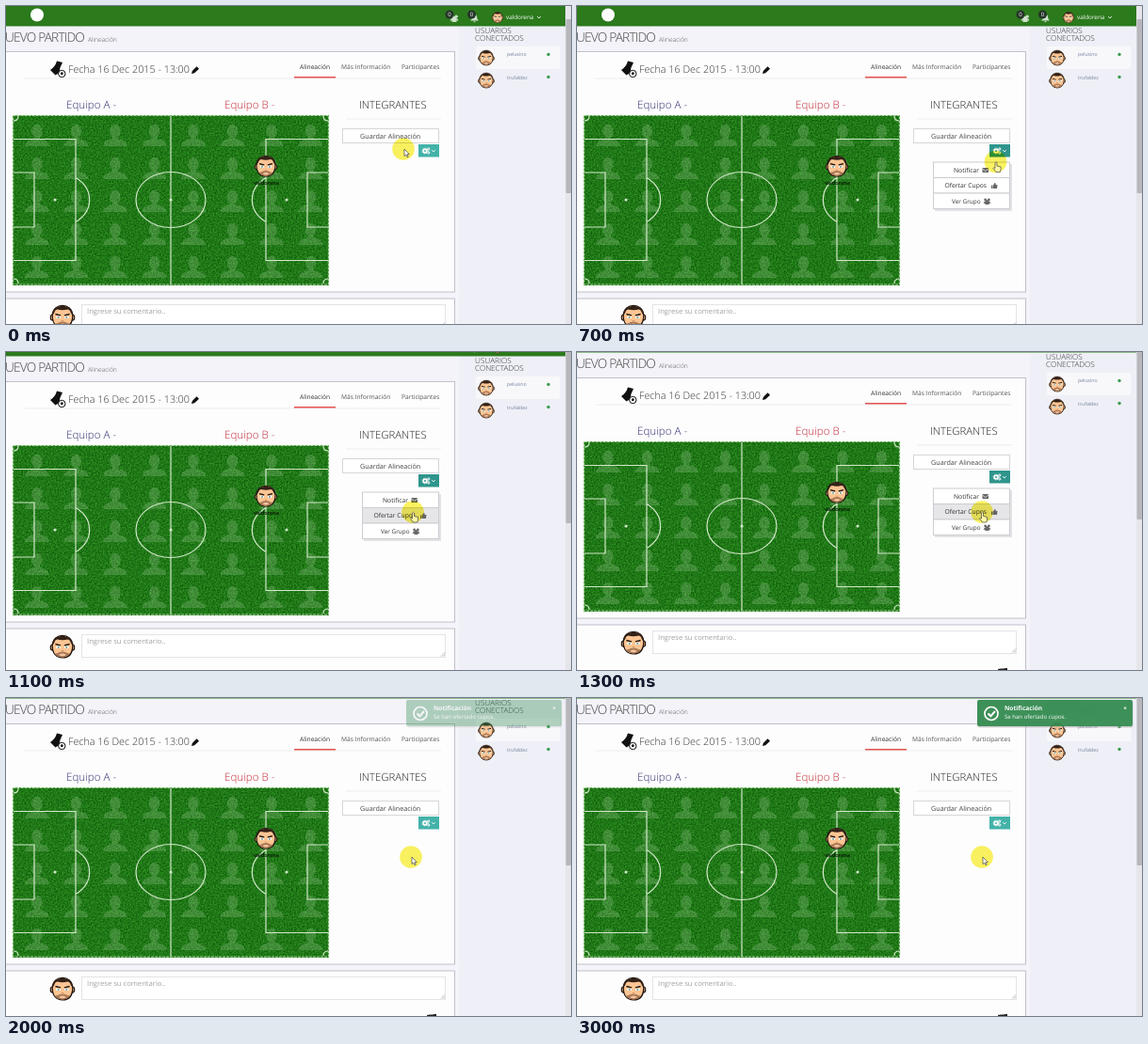
Recreate the animation shown at these times as an HTML page. Size 600 px wide and 338 px high, loop 3.1 s.

```html
<!DOCTYPE html>
<html lang="es">
<head>
<meta charset="utf-8">
<style>
html, body { margin: 0; width: 100%; height: 100%; overflow: hidden; background: #f3f3f9; }
svg { display: block; width: 600px; height: 338px; font-family: "Open Sans", "Noto Sans", sans-serif; text-rendering: geometricPrecision; }
.light { font-weight: 300; }
.line { fill: none; stroke: #d3e8cb; stroke-width: 1.2; }
#halo { mix-blend-mode: multiply; }
</style>
</head>
<body>
<svg viewBox="0 0 600 338">
  <defs>
    <filter id="grass" x="0" y="0" width="1" height="1" color-interpolation-filters="sRGB">
      <feTurbulence type="fractalNoise" baseFrequency=".6" numOctaves="2" seed="4"/>
      <feColorMatrix values=".25 0 0 0 0  .4 0 0 0 .27  .2 0 0 0 -.01  0 0 0 0 1"/>
    </filter>
    <g id="face">
      <ellipse cx="-10" cy="1" rx="1.800" ry="2.800" fill="#f0b27c" stroke="#1c130e"/>
      <ellipse cx="10" cy="1" rx="1.800" ry="2.800" fill="#f0b27c" stroke="#1c130e"/>
      <path d="M-10-1C-9.500-14 9.500-14 10-1 10 7 6 11 0 11S-10 7-10-1Z" fill="#fcc593" stroke="#1c130e" stroke-width="1.200"/>
      <path d="M-9.800-1C-9.300-13.500 9.300-13.500 9.800-1L8-4Q7-7 5-7 0-5.500-5-7-7-7-8-4Z" fill="#332117"/>
      <path d="M-7.500 7Q-4 6.500-3 5.500 0 4.500 3 5.500 4 6.500 7.500 7 5 10.800 0 10.800T-7.500 7Z" fill="#a97855"/>
      <path d="M-3.500 8Q0 6 3.500 8 2 9.500 0 9.500T-3.500 8Z" fill="#f3c4a0"/>
      <path d="M-7-2.300L-1.800-1M7-2.300L1.800-1" stroke="#1c130e" stroke-width="1.300"/>
      <path d="M-6.200 .8H-2M6.200 .8H2" stroke="#fff" stroke-width="2"/>
      <path d="M-4.800 .8H-3.200M4.800 .8H3.200" stroke="#5a9a9a" stroke-width="1.800"/>
      <path d="M-1.200 4Q0 4.700 1.200 4" fill="none" stroke="#cf8d60" stroke-width=".8"/>
    </g>
    <g id="bust">
      <ellipse cy="-4" rx="5.700" ry="7.200"/>
      <path d="M-13 12Q-13 6-3 4V0H3V4Q13 6 13 12Z"/>
    </g>
    <g id="half" class="line">
      <path d="M8 141.500H74V270.500H8M8 177H30V235H8M74 182.500A37 29.500 0 0 1 74 229.500M8 122Q13 122 13 117M8 290Q13 290 13 295"/>
      <circle cx="52" cy="206" r="1" fill="#fff"/>
    </g>
    <g id="people">
      <circle cx="-2.200" cy="-1.800" r="1.600"/><circle cx="2.200" cy="-1.800" r="1.600"/><circle r="1.900"/>
      <path d="M-4.500 2.500Q-4 0-2 0H2Q4 0 4.500 2.500ZM-2.800 4Q-2.500 1.500 0 1.500T2.800 4Z"/>
    </g>
    <path id="chevron" d="M-1.700-.8L0 .9 1.700-.8" fill="none" stroke="#fff"/>
  </defs>

  <rect width="600" height="338" fill="#f3f3f9"/>
  <g id="page">
    <rect x="481" width="113" height="380" fill="#eff0f7"/>
    <g class="light" font-size="8.200" fill="#333">
      <text x="498" y="28.500">USUARIOS</text><text x="498" y="36.500">CONECTADOS</text>
    </g>
    <rect x="499" y="43" width="89" height="24" rx="2" fill="#f8f8fb"/>
    <g font-size="5.200" fill="#71809a">
      <text x="532" y="53">pelusino</text><text x="532" y="77.500">trufaldez</text>
    </g>
    <use href="#face" transform="translate(510 55) scale(.72)"/>
    <use href="#face" transform="translate(510 79) scale(.72)"/>
    <circle cx="576" cy="51.500" r="1.700" fill="#3b9c52"/><circle cx="576" cy="75.500" r="1.700" fill="#3b9c52"/>

    <rect width="594" height="22" y="-.5" fill="#2b7a1c"/>
    <circle cx="33" cy="9.500" r="7" fill="#fff"/>
    <g fill="#cfe3cd">
      <use href="#people" x="476" y="13"/>
      <path d="M493 15.500Q495 14 495 11.500 495 9 497.500 9T500 11.500Q500 14 502 15.500ZM496 16.200H499L497.500 17.500Z"/>
    </g>
    <g fill="#26352a"><circle cx="471" cy="9" r="4.500"/><circle cx="494.500" cy="9" r="4.500"/></g>
    <g fill="#fff" font-size="6">
      <text x="469.300" y="11.200">0</text><text x="492.800" y="11.200">0</text>
      <text x="531" y="14.200" font-size="6.300">valdorena</text>
    </g>
    <use href="#face" transform="translate(522 12) scale(.52)"/>
    <use href="#chevron" x="566" y="12"/>

    <text class="light" x="-1" y="38" font-size="13.700" letter-spacing="-.8" fill="#444">UEVO PARTIDO</text>
    <text class="light" x="87" y="37.500" font-size="6.700" fill="#555">Alineación</text>

    <g fill="#fdfdfe" stroke="#c0c1ca">
      <rect x="-2" y="48.500" width="478.500" height="255.500"/>
      <rect x="-2" y="311" width="478.500" height="80"/>
    </g>
    <path d="M20 77H462M361 120H462" stroke="#ededf0"/>
    <path d="M306 75.700H350" stroke="#e55050" stroke-width="1.600"/>
    <g fill="#111">
      <path d="M54 58.500L60 60 57.500 65.500 56.500 71 52.500 73.500 47 68Q52 65 54 58.500Z"/>
      <circle cx="59.300" cy="72" r="3.700" fill="#fff" stroke="#111"/>
      <path d="M57.800 71.200L59.300 70 60.800 71.200 60.300 73H58.300Z"/>
      <path d="M197 72L197.800 69 202.500 64.300 205 66.800 200.200 71.300Z"/>
    </g>
    <text class="light" x="66" y="71" font-size="10.800" fill="#333">Fecha 16 Dec 2015 - 13:00</text>
    <g font-size="6.650" fill="#555">
      <text x="312" y="67" fill="#333">Alineación</text>
      <text x="356" y="67">Más Información</text><text x="420" y="67">Participantes</text>
    </g>
    <g class="light" font-size="11.600">
      <text x="64" y="109" fill="#30306f">Equipo A -</text>
      <text x="232" y="109" fill="#c02a34">Equipo B -</text>
      <text x="375" y="108.500" font-size="11.350" fill="#222">INTEGRANTES</text>
    </g>

    <rect x="7" y="116" width="336" height="180.500" filter="url(#grass)"/>
    <g id="busts" fill="#c8e8c0"></g>
    <use href="#half"/><use href="#half" transform="matrix(-1 0 0 1 350 0)"/>
    <g class="line">
      <path d="M175 117V296"/>
      <ellipse cx="175" cy="206" rx="37" ry="29.500"/>
      <circle cx="175" cy="206" r="1" fill="#fff"/>
      <rect x="7.500" y="116.500" width="335" height="179.500" stroke="#a9d69f" stroke-dasharray="3 1"/>
    </g>
    <use href="#face" x="276" y="170"/>
    <text x="276.500" y="190" font-size="5.600" text-anchor="middle" fill="#061005" font-weight="600">valdorena</text>

    <rect x="357.500" y="130.500" width="102" height="15" fill="#fff" stroke="#d6d6da"/>
    <text x="376" y="140.500" font-size="7.200" fill="#444">Guardar Alineación</text>
    <rect id="gear" x="438" y="147" width="22" height="13.500"/>
    <g fill="none" stroke="#fff">
      <circle cx="445" cy="154" r="1.800" stroke-width="1.600"/>
      <circle cx="445" cy="154" r="2.900" stroke-dasharray="1.200 1.100"/>
      <circle cx="448.800" cy="152" r="1.100"/><circle cx="448.800" cy="156" r="1.100"/>
    </g>
    <use href="#chevron" x="454" y="154"/>

    <g id="menu" font-size="6.750" fill="#333">
      <rect x="380" y="168" width="82" height="50" fill="#e3e3e6"/>
      <g stroke="#cdcdd2">
        <rect class="item" x="378.500" y="166" width="81" height="16.500"/>
        <rect class="item" x="378.500" y="182.500" width="81" height="16.500"/>
        <rect class="item" x="378.500" y="199" width="81" height="16.500"/>
      </g>
      <text x="400" y="176.500">Notificar</text>
      <text x="390.500" y="193">Ofertar Cupos</text>
      <text x="398" y="209.800" font-size="6.400">Ver Grupo</text>
      <g fill="#666">
        <rect x="430.500" y="172" width="6.500" height="5" rx=".6"/>
        <path d="M430.500 173L433.700 175.500 437 173" fill="none" stroke="#fff" stroke-width=".7"/>
        <path d="M440 190.500H441.500V194H440ZM442 190.500L443.500 188Q445 187.500 444.600 190H446.500L446 194H442Z"/>
        <use href="#people" transform="translate(435.500 207.500) scale(.85)"/>
      </g>
    </g>

    <rect x="80.500" y="317.500" width="386" height="24" fill="#fff" stroke="#e4e4e8"/>
    <path d="M462 340.500L466 336.500M464.500 340.500L466 339" stroke="#999" stroke-width=".7"/>
    <text x="86" y="327" font-size="7.650" fill="#a2a2a2">Ingrese su comentario..</text>
    <use href="#face" transform="translate(60 330) scale(1.080)"/>
    <path d="M447 359V358L450 357.500H453L455 357H457V359Z" fill="#222"/>
  </g>

  <rect x="594" width="6" height="338" fill="#e6e6ea"/>
  <rect id="thumb" x="594.500" y="14" width="5.500" height="185" rx="1" fill="#b8b8bc"/>

  <g id="toast">
    <rect x="425.500" y="3" width="165" height="28.500" rx="2" fill="#999" opacity=".5"/>
    <rect x="425" y="2" width="165" height="28" rx="2" fill="#378d53"/>
    <circle cx="440" cy="16.500" r="7" fill="none" stroke="#fff" stroke-width="1.700"/>
    <path d="M436.500 16.500L439.300 19.300 444 14" fill="none" stroke="#fff" stroke-width="2"/>
    <g fill="#fff">
      <text x="454" y="12.500" font-size="6.600" font-weight="700">Notificación</text>
      <text x="454" y="22.300" font-size="6.050">Se han ofertado cupos.</text>
      <text x="580.300" y="13" font-size="6.500" font-weight="700">×</text>
    </g>
  </g>

  <circle id="halo" r="11.800" fill="#faf25e"/>
  <path id="arrow" d="M1 0V7.500L2.800 6 4 8.700 5.200 8.100 4 5.600H6.300Z" fill="#fff" stroke="#444" stroke-width=".7"/>
  <path id="hand" d="M-.5 1Q.5-.5 1.500 1V4.500L5.500 5.500Q6 8 4.800 11H.5L-2.500 7Q-2 5.500-.5 7Z" fill="#fff8a8" stroke="#444" stroke-width=".7"/>
</svg>
<script>
const LOOP = 3100, STEP = 100;
const $ = id => document.getElementById(id);
const clamp = x => Math.max(0, Math.min(1, x));
const smooth = x => x * x * (3 - 2 * x);
const swing = x => (1 - Math.cos(Math.PI * x)) / 2;
const show = (el, on) => el.setAttribute("visibility", on ? "visible" : "hidden");
const move = (el, x, y) => el.setAttribute("transform", `translate(${x} ${y})`);

// time, x, y of the pointer
const path = [[0, 422, 152], [250, 453, 157], [500, 453, 157], [850, 439, 171],
  [1100, 432, 170], [1300, 430, 170], [1600, 430, 169], [LOOP, 430, 169]];

function pointer(t) {
  const i = path.findIndex((p, n) => n && t <= p[0]);
  const [a, b] = [path[i - 1], path[i]];
  const k = smooth((t - a[0]) / (b[0] - a[0]));
  return [1, 2].map(n => a[n] + (b[n] - a[n]) * k);
}

let busts = "";
for (let i = 0; i < 40; i++)
  busts += `<use href="#bust" x="${33 + i % 8 * 41.5}" y="${137 + Math.floor(i / 8) * 35}" opacity=".2"/>`;
$("busts").innerHTML = busts;
const items = document.querySelectorAll(".item");

function draw(now) {
  const t = Math.floor(now % LOOP / STEP) * STEP;
  const pan = Math.round(21 * smooth(clamp((t - 770) / 455)));
  const [x, y] = pointer(t);
  const open = t >= 300 && t < 1500;
  const onLink = t >= 200 && t < 1500;

  move($("page"), 0, -pan);
  move($("thumb"), 0, -pan);
  for (const id of ["halo", "arrow", "hand"]) move($(id), x, y);
  show($("arrow"), !onLink);
  show($("hand"), onLink);
  show($("menu"), open);
  items.forEach((item, i) => {
    const top = 166 + i * 16.5 - pan;
    item.setAttribute("fill", y >= top && y < top + 16.5 ? "#e6e6e8" : "#fff");
  });
  $("gear").setAttribute("fill", open ? "#2f958c" : "#43b2a9");
  $("toast").setAttribute("opacity", 0.96 * swing(clamp((t - 1620) / 900)));
  requestAnimationFrame(draw);
}
requestAnimationFrame(draw);
</script>
</body>
</html>
```
